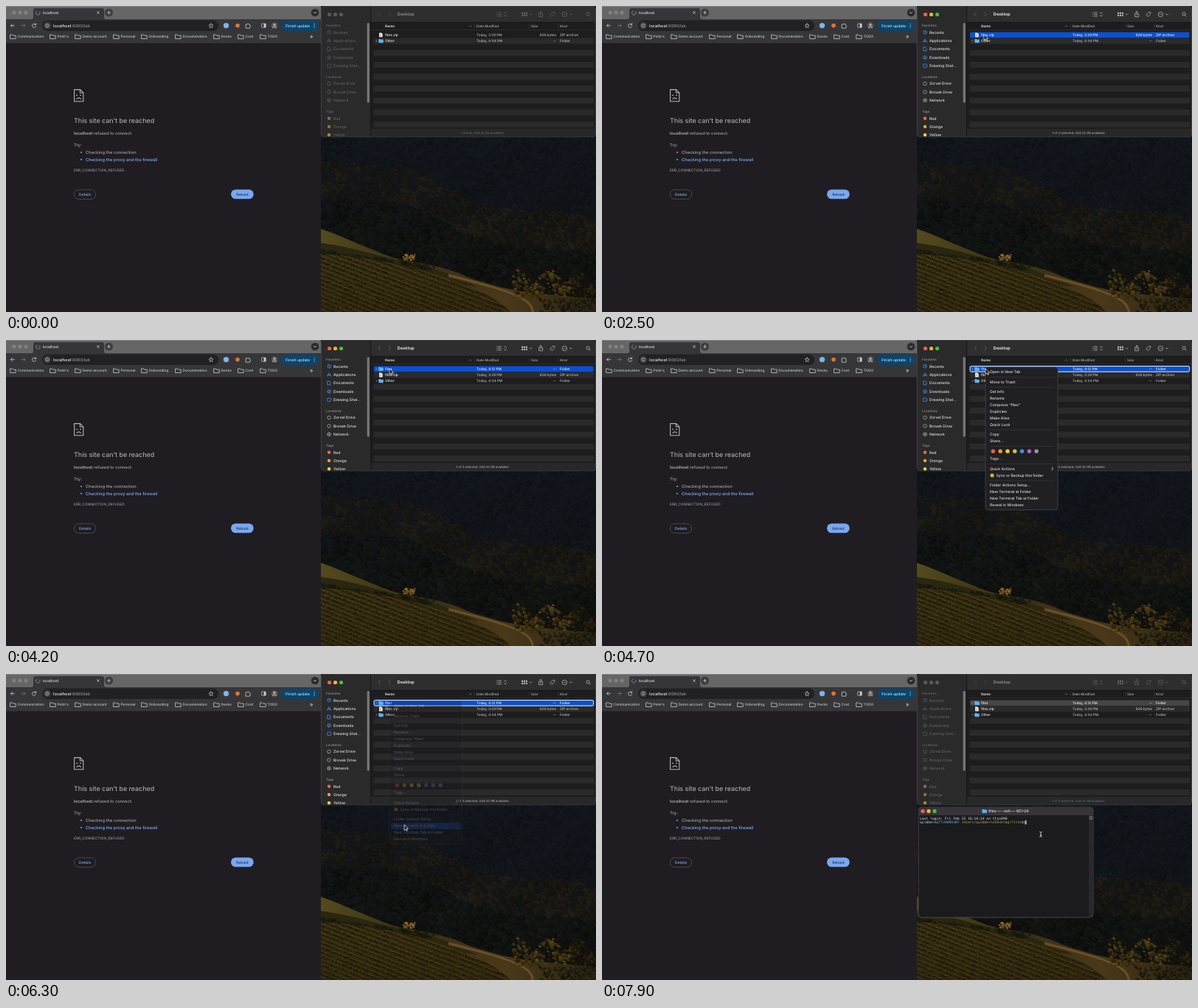
Recreate the animation shown at these times as an HTML page with a canvas. Size 800 by 416 pixels, loop 8 s.

```html
<!DOCTYPE html>
<html lang="en">
<head>
<meta charset="utf-8">
<title>Desktop session</title>
<style>
html, body { margin: 0; width: 100%; height: 100%; overflow: hidden; background: #1f1d21; }
canvas, svg { position: absolute; left: 0; top: 0; width: 800px; height: 416px; }
text { font-family: Inter, "Liberation Sans", sans-serif; text-rendering: geometricPrecision; white-space: pre; }
.mono { font-family: "DejaVu Sans Mono", "Noto Sans Mono", monospace; }
#pointer { animation: move 8s linear infinite; }
#menu { animation: menu 8s linear infinite; }
@keyframes move {
  0%, 4% { transform: translate(600px, 290px); }
  14%, 22% { transform: translate(521px, 39px); }
  25%, 46% { transform: translate(518px, 39px); }
  52%, 64% { transform: translate(520px, 39px); }
  75%, 82% { transform: translate(540px, 205px); }
  92%, 100% { transform: translate(595px, 218px); }
}
@keyframes menu {
  0%, 56.24% { opacity: 0; }
  56.25%, 76.87% { opacity: 1; }
  79.38%, 100% { opacity: 0; }
}
</style>
</head>
<body>
<canvas width="800" height="416"></canvas>
<svg viewBox="0 0 800 416"></svg>
<script>
// ---- drawing helpers ----
const text = (x, y, s, size, fill, extra = '') =>
  `<text x="${x}" y="${y + size * 0.36}" font-size="${size}" fill="${fill}" ${extra}>${s}</text>`;
const rect = (x, y, w, h, fill, r = 0, extra = '') =>
  `<rect x="${x}" y="${y}" width="${w}" height="${h}" rx="${r}" fill="${fill}" ${extra}/>`;
const dot = (x, y, r, fill, extra = '') => `<circle cx="${x}" cy="${y}" r="${r}" fill="${fill}" ${extra}/>`;
const line = (d, stroke, w = 0.8, fill = 'none') =>
  `<path d="${d}" stroke="${stroke}" stroke-width="${w}" fill="${fill}" stroke-linecap="round" stroke-linejoin="round"/>`;
const medium = 'font-weight="500"', semi = 'font-weight="600"', end = 'text-anchor="end"', mid = 'text-anchor="middle"';

let rules = '', count = 0;
// Visible only between two times in ms
function show(from, to, body) {
  const name = 'v' + count++;
  rules += `@keyframes ${name}{0%{opacity:${from ? 0 : 1}}${from / 80}%{opacity:1}${to / 80}%{opacity:0}}`;
  return `<g style="animation:${name} 8s step-end infinite">${body}</g>`;
}

const lights = (x, y, gap, r, colors) => colors.map((c, i) => dot(x + i * gap, y, r, c)).join('');
const bright = ['#f45f52', '#f0b52f', '#4bbb45'];

// ---- browser ----
function browser() {
  const ink = '#c9cbd0', bar = '#363639', body = '#a3a5aa', link = '#82b0f6';
  const marks = [[6, 'Communication'], [60, "Pelm's"], [94, 'Demo account'], [146, 'Personal'], [184, 'Onboarding'],
    [230, 'Documenation'], [282, 'Decks'], [315, 'Cost'], [345, 'TODO']];
  const folder = x => line(`M${x} 39h2.6l1 1.2h3.6v4.3h-7.2z`, ink, 0.8);
  return rect(0, 0, 427, 416, '#1f1d21') +
    rect(0, 0, 427, 20, '#666667') + rect(0, 0, 427, 0.8, '#8a8a8b') +
    lights(11, 9, 8, 2.5, ['#828283', '#828283', '#828283']) +
    `<path d="M34 18q3 0 3-3V6q0-3 3-3h90q3 0 3 3v9q0 3 3 3z" fill="${bar}"/>` +
    rect(0, 18, 427, 32.5, bar) +
    line('M42 6.8a2.8 2.8 0 1 0 3.8 1.2', '#9b9da2', 0.8) +
    text(50, 9, 'localhost', 4.9, '#e6e6e8', medium) +
    line('M123.6 7.6l2.8 2.8m0-2.8l-2.8 2.8', '#d8d8da', 0.7) +
    dot(139.5, 9, 5.6, '#3e3e40') + line('M137.5 9h4m-2-2v4', '#d8d8da', 0.7) +
    dot(419, 9, 5.3, '#2c2c2e') + line('M417.4 8.4l1.6 1.6 1.6-1.6', '#d8d8da', 0.8) +
    line('M11.5 26.6h-5m2.2-2.2l-2.2 2.2 2.2 2.2', ink) +
    line('M21 26.6h5m-2.2-2.2l2.2 2.2-2.2 2.2', '#77787c') +
    line('M40.3 25.2a2.6 2.6 0 1 0 .4 2.2M40.6 23.6v1.9h-1.9', ink) +
    rect(49, 19.5, 239, 14.5, '#212124', 7.2) +
    dot(56, 26.6, 5, '#3a3a3e') + dot(56, 26.6, 2.4, 'none', `stroke="${ink}" stroke-width=".7"`) +
    line('M56 26.4v1.3M56 25.3v.1', ink, 0.6) +
    text(64, 26.6, '<tspan fill="#f0f0f2" font-weight="500">localhost</tspan>:8080/lab', 5.6, '#a4a6ab') +
    line('M278 23.8l.9 2 2.1.2-1.6 1.4.5 2.1-1.9-1.1-1.9 1.1.5-2.1-1.6-1.4 2.1-.2z', ink, 0.7) +
    dot(298.5, 26.6, 3.7, '#7fb4e6') + dot(314, 26.6, 2.8, '#d8773a') +
    line('M325.5 25h1.6a1 1 0 0 1 2 0h1.5v1.7a1 1 0 0 1 0 2v1.5h-5.1z', ink, 0.8) +
    rect(346.6, 24, 5.6, 5.2, 'none', 0.6, `stroke="${ink}" stroke-width=".7"`) + rect(349.6, 24, 2.6, 5.2, ink) +
    dot(364, 26.6, 4.4, '#55585c') + dot(364, 25.4, 1.6, '#b7aaa2') + line('M361.7 29.4q2.3-3 4.6 0', '#b7aaa2', 1.2) +
    rect(373, 19.8, 51, 14, '#0b446d', 7) + text(379, 26.7, 'Finish update', 5.15, '#bfe0fb', medium) +
    [24.5, 26.7, 28.9].map(y => dot(418, y, 0.6, '#bfe0fb')).join('') +
    marks.map(([x, s]) => folder(x) + text(x + 9.6, 41.6, s, 4.75, ink, medium)).join('') +
    text(412, 40.8, '»', 7.5, '#e2e2e4') +
    line('M92.6 113.6h8l4.2 4.2v12h-12.2zM100.4 113.8v4.2h4.2M95.6 121.4h.9M100.6 121.4h.9M96 126.4q2.7-3 5.4 0', '#b2b4b9', 1.1) +
    text(92, 155.5, 'This site can’t be reached', 8.9, '#a6a8ad', medium) +
    text(92, 173, '<tspan font-weight="700">localhost</tspan> refused to connect.', 5.65, body, medium) +
    text(92, 188.5, 'Try:', 5.8, body, medium) +
    dot(102, 199, 1, body) + text(108, 198.6, 'Checking the connection', 5.75, body, medium) +
    dot(102, 208.8, 1, link) + text(108, 208.5, 'Checking the proxy and the firewall', 5.75, link, medium) +
    text(92, 223.6, 'ERR_CONNECTION_REFUSED', 4.85, '#94969b', medium) +
    rect(92.3, 249.8, 29.4, 12.8, 'none', 6.4, 'stroke="#595b66" stroke-width=".7"') +
    text(107, 256.2, 'Details', 4.95, link, mid + ' ' + medium) +
    rect(305, 249.5, 30.7, 12.8, '#7aa7f0', 6.4) +
    text(320.4, 255.9, 'Reload', 4.95, '#1c2d4c', mid + ' ' + medium);
}

// ---- file window ----
const folderIcon = (x, y) => rect(x, y - 2.6, 3, 2, '#4e9fdd', 0.5) + rect(x, y - 1.9, 6.4, 4.5, '#62b3ec', 0.6);
const pageIcon = (x, y) => `<path d="M${x} ${y - 2.9}h3l1.6 1.6v4.2h-4.6z" fill="#eee"/>` + rect(x + 1.5, y - 1, 1, 2.6, '#888');

function sidebar(on) {
  const ink = on ? '#e4e4e5' : '#6a6a6b', head = on ? '#8a8a8b' : '#646465';
  const blue = on ? '#3f94f0' : '#535a63', grey = on ? '#a6a6a8' : '#5c5c5d';
  const box = y => rect(435.7, y - 2.2, 4.8, 4.4, 'none', 0.7, `stroke="${blue}" stroke-width=".8"`);
  const ring = (y, c) => dot(438, y, 2.3, 'none', `stroke="${c}" stroke-width=".8"`);
  const items = [
    [35.7, 'Recents', ring(35.7, blue) + line('M438 34.4v1.4h1', blue, 0.6)],
    [47.1, 'Applications', line('M436 49.2l2-4.4 2 4.4M435.5 48h5', blue)],
    [58.5, 'Documents', line('M436.2 56h2.4l1.4 1.4v3.6h-3.8z', blue)],
    [70, 'Downloads', ring(70, blue) + line('M438 68.8v2.4m-1-1l1 1 1-1', blue, 0.6)],
    [81.2, 'Drawing Shel...', box(81.2)],
    [105.5, 'Zorvel Drive', ring(105.5, grey)],
    [116.9, 'Brovek Drive', ring(116.9, grey)],
    [128.2, 'Network', ring(128.2, grey) + line('M435.8 128.2h4.4M438 126v4.4', grey, 0.6)],
    [152.8, 'Red', dot(438, 152.8, 2.2, on ? '#f0694f' : '#84686f')],
    [164, 'Orange', dot(438, 164, 2.2, on ? '#f3a136' : '#a06d2e')],
    [175.2, 'Yellow', dot(438, 175.2, 2.2, on ? '#f5d13c' : '#a68a30')]];
  return [[26, 'Favorites'], [96.5, 'Locations'], [143.5, 'Tags']]
    .map(([y, s]) => text(434, y, s, 4.4, head, semi)).join('') +
    items.map(([y, s, icon]) => icon + text(444, y, s, 5.1, ink, on ? medium : '')).join('');
}

function toolbar(on) {
  const ink = on ? '#b4b4b6' : '#646465', faint = on ? '#646466' : '#4a4a4c';
  const grid = [0, 3.1].map(y => [0, 2.9, 5.8].map(x => rect(699 + x, 8.6 + y, 2.1, 2.3, ink, 0.4)).join('')).join('');
  return lights(438.5, 11.5, 8, 2.6, on ? bright : ['#59595a', '#59595a', '#59595a']) +
    line('M507.4 8.8l-2.4 2.6 2.4 2.6M518.8 8.8l2.4 2.6-2.4 2.6', faint, 0.9) +
    text(530.5, 11.4, 'Desktop', 5.8, on ? '#ececed' : '#8c8c8d', semi) +
    line('M667 9h4.5M667 11.4h4.5M667 13.8h4.5M665.2 9h.1M665.2 11.4h.1M665.2 13.8h.1', ink) +
    line('M675.6 10.2l1.4-1.5 1.4 1.5M675.6 12.6l1.4 1.5 1.4-1.5', ink) +
    grid + line('M710 10.8l1.4 1.4 1.4-1.4', ink) +
    line('M723.8 10.2h-1.2v4.4h5v-4.4h-1.2M725.1 12.4v-5m-1.4 1.4l1.4-1.4 1.4 1.4', ink) +
    line('M738 11.8l3.4-3.4h2.4v2.4l-3.4 3.4z', ink) +
    dot(757.4, 11.4, 3.2, 'none', `stroke="${ink}" stroke-width=".8"`) +
    line('M755.9 11.4h.1M757.4 11.4h.1M758.9 11.4h.1', ink) + line('M764.6 10.8l1.4 1.4 1.4-1.4', ink) +
    dot(789, 10.8, 2.1, 'none', `stroke="${ink}" stroke-width=".8"`) + line('M790.6 12.4l1.6 1.7', ink);
}

function frame() {
  let stripes = '';
  for (let i = 1; i < 17; i += 2) stripes += rect(498.5, 35.4 + i * 8.1, 298.5, 8.1, '#2a2a2b', 1.6);
  return rect(427.4, 0.4, 372.2, 177.4, '#1d1d1e', 4, 'stroke="#505051" stroke-width=".8"') +
    `<path d="M494.5 177.4H432q-4 0-4-4V4.8q0-4 4-4h62.5z" fill="#2a2a2b"/>` +
    `<path d="M495 22V.8h300q4 0 4 4V22z" fill="#2e2e2f"/>` +
    rect(494.2, 0.8, 0.7, 176.6, '#111') + rect(495, 21.8, 304, 0.6, '#101011') +
    rect(495, 32, 304, 0.5, '#3a3a3b') + rect(495, 167.6, 304, 0.5, '#3a3a3b') +
    `<path d="M495 168h304v5.4q0 4-4 4H495z" fill="#28282a"/>` +
    rect(489.6, 23, 3.2, 108.5, '#777778', 1.6) +
    [635, 709, 748].map(x => rect(x, 24, 0.5, 6.5, '#464647')).join('') +
    text(514, 27.2, 'Name', 4.6, '#e6e6e7', semi) + line('M628.3 27.9l1.3-1.3 1.3 1.3', '#a5a5a6', 0.6) +
    [[638, 'Date Modified'], [712, 'Size'], [751, 'Kind']].map(([x, s]) => text(x, 27.2, s, 4.5, '#b5b5b6', medium)).join('') +
    stripes;
}

const zip = ['files.zip', '3:29 PM', '926 bytes', 'ZIP archive'];
const files = ['files', '4:12 PM', '--', 'Folder'];
const other = ['Other', '4:04 PM', '--', 'Folder'];

function rows(list, picked, fill, ring) {
  return list.map(([name, time, size, kind], i) => {
    const y = 39.4 + i * 8.1, on = i === picked, ink = on ? '#f2f4f8' : '#bcbcbe';
    const edge = ring && on ? 'stroke="#f0f4ff" stroke-width="1"' : '';
    const icon = kind === 'Folder'
      ? line(`M501.8 ${y - 1.3}l1.3 1.3-1.3 1.3`, '#a5a5a6', 0.7) + folderIcon(505.3, y)
      : pageIcon(506, y);
    return (on ? rect(499, y - 3.8, 297.6, 7.6, fill, 1.6, edge) : '') + icon +
      text(514, y, name, 4.75, '#ececed', medium) + text(638, y, 'Today, ' + time, 4.65, ink, medium) +
      text(746, y, size, 4.7, ink, end + ' ' + medium) + text(751, y, kind, 4.7, ink, medium);
  }).join('');
}

const status = (s, on) => text(646, 172.4, s + ', 244.32 GB available', 4.2, on ? '#a9a9aa' : '#666667', mid + ' ' + medium);

function finder() {
  const blue = '#0b50cf', three = [files, zip, other];
  const off = sidebar(false) + toolbar(false);
  return `<clipPath id="win"><rect x="428" y="0" width="371" height="177.4" rx="4"/></clipPath>` +
    frame() + '<g clip-path="url(#win)">' +
    show(0, 1900, off + rows([zip, other], -1) + status('2 items', false)) +
    show(1900, 6700, sidebar(true) + toolbar(true)) +
    show(1900, 3000, rows([zip, other], 0, blue) + status('1 of 2 selected', true)) +
    show(3000, 4200, rows(three, 1, blue)) +
    show(4200, 4500, rows(three, 0, blue)) +
    show(4500, 6400, rows(three, 0, blue, true)) +
    show(6400, 6700, rows(three, 0, blue)) +
    show(3000, 6700, status('1 of 3 selected', true)) +
    show(6700, 8000, off + rows(three, 0, '#454546') + status('1 of 3 selected', false)) + '</g>';
}

// ---- context menu ----
function menu() {
  const items = [[43.5, 'Open in New Tab'], [57, 'Move to Trash'], [70.5, 'Get Info'], [79.4, 'Rename'],
    [88.3, 'Compress “files”'], [97.2, 'Duplicate'], [106.2, 'Make Alias'], [115.1, 'Quick Look'],
    [128.5, 'Copy'], [137.5, 'Share...'], [161.4, 'Tags...'], [175, 'Quick Actions'], [184, 'Sync or Backup this folder'],
    [197.6, 'Folder Actions Setup...'], [206.6, 'New Terminal at Folder'], [215.5, 'New Terminal Tab at Folder'],
    [224.4, 'Reveal in Windows']];
  const tags = ['#ef5b50', '#f09a36', '#f2cb3c', '#c9c445', '#4b8df0', '#a86bd0', '#98989a'];
  // Pointer travels 39 to 205 between 5120 and 6000 ms
  const reach = y => 5120 + (y - 39) / 166 * 880;
  const hover = items.slice(0, 15).map(([y], i) =>
    show(Math.round(reach(y - 4.4)), i === 14 ? 6400 : Math.round(reach(y + 4.4)), rect(522, y - 4.4, 94.5, 8.8, '#2c56b8', 1.6))).join('');
  return rect(520, 37, 98, 194, '#202022', 3, 'stroke="#505053" stroke-width=".7"') + hover +
    [50.3, 63.8, 121.8, 144.2, 168.2, 190.8].map(y => rect(525.5, y, 87, 0.5, '#454547')).join('') +
    items.map(([y, s]) => text(s.startsWith('Sync') ? 534.5 : 526, y, s, 5.1, '#dedee0', medium)).join('') +
    tags.map((c, i) => dot(530.3 + i * 9.8, 151.2, 2.7, c)).join('') +
    dot(529, 184, 2.6, '#d9b13a') + line('M609.8 173l1.9 2-1.9 2', '#dedee0', 0.8);
}

// ---- terminal ----
function terminal() {
  const type = (y, s) => text(431, y, s, 4.7, '#e2e2e4', 'class="mono"');
  const user = 'quibbern';
  return rect(429, 181, 237, 150, '#1b1a1d', 4, 'stroke="#5a5a5d" stroke-width=".7"') +
    `<path d="M429.4 192v-7q0-3.6 3.6-3.6h229q3.6 0 3.6 3.6v7z" fill="#37353a"/>` +
    lights(435, 186.4, 8, 2.6, bright) + folderIcon(515.5, 186.4) +
    text(524, 186.4, 'files — -zsh — 80×24', 5.2, '#cfcfd2', semi) +
    `<path d="M660 192h5.6v135q0 3.6-3.6 3.6h-2z" fill="#29282c"/>` +
    rect(661.3, 193.6, 3.4, 4, 'none', 0.4, 'stroke="#a5a5a8" stroke-width=".6"') + rect(662.2, 195.4, 1.6, 0.6, '#a5a5a8') +
    show(7000, 8000, type(196, 'Last login: Fri Feb 23 16:10:34 on ttys000')) +
    show(7300, 8000, type(201.8, `<tspan fill="#b9d3dc">${user}</tspan><tspan fill="#5aa7e6">@TYJWWDN4BY</tspan> ` +
      `<tspan fill="#b0aa45">/Users/${user}/Desktop/files</tspan>$`) + rect(573, 199.2, 2.8, 5.2, '#a0a0a3'));
}

function pointer() {
  const arrow = '<path d="M0 0v7.4l1.8-1.6 1.2 2.6 1.3-.6-1.2-2.5h2.4z" fill="#0a0a0a" stroke="#fff" stroke-width=".7"/>';
  const beam = line('M-1.5-3.4q1.5 0 1.5 1v4.8q0 1-1.5 1M1.5-3.4q-1.5 0-1.5 1M1.5 3.4q-1.5 0-1.5-1M-.8.8h1.6', '#e6e6e6', 0.8);
  return show(400, 6900, arrow) + show(6900, 8000, beam);
}

// ---- wallpaper ----
function wallpaper(g) {
  let seed = 7;
  const rnd = (a, b) => a + (b - a) * ((seed = seed * 16807 % 2147483647) / 2147483647);
  const shape = (d, fill) => { g.fillStyle = fill; g.fill(new Path2D(d)); };
  const fade = (x0, y0, x1, y1, ...stops) => {
    const f = g.createLinearGradient(x0, y0, x1, y1);
    stops.forEach((c, i) => f.addColorStop(i / (stops.length - 1), c));
    return f;
  };
  // Soft foliage clump: shaded base with a lighter crown
  const leaf = (x, y, r, h, s, l, depth = 1) => {
    for (const [shift, k, up] of [[0.35, 1, -2], [0, 0.8, 0], [-0.3, 0.4, 1.5]]) {
      g.fillStyle = `hsl(${h} ${s}% ${Math.max(2, l + up * depth)}%)`;
      g.beginPath();
      g.ellipse(x + shift * r, y + shift * r, r * k, r * k * 0.85, 0, 0, 7);
      g.fill();
    }
  };

  g.fillStyle = fade(0, 178, 0, 400, '#12171d', '#111418', '#10110c');
  g.fillRect(427, 0, 373, 416);
  for (let i = 0; i < 3000; i++) {
    const y = 170 + i / 3000 * 215, x = rnd(424, 804), r = rnd(1.2, 2.8) + (y - 170) / 80;
    const d = y - 200 - (x - 427) * 0.27 + 10 * Math.sin(x / 38);
    const glow = 0.5 + 0.5 * Math.sin(x / 23 + y / 17);
    if (d < 0) leaf(x, y, r, rnd(205, 222), 24, rnd(7, 9) + glow, 0.5);
    else if (d < 50) leaf(x, y, r, rnd(38, 60), 18, rnd(6.5, 9) + glow * 1.5, 0.7);
    else leaf(x, y, r, rnd(60, 190), 10, rnd(5, 7.5) + glow, 0.7);
  }

  shape('M427 303C455 312 490 330 525 342C560 350 590 352 625 368C665 384 700 390 800 398V416H427Z',
    fade(427, 0, 800, 0, '#554a1d', '#352e13', '#4a381a', '#2b2510'));
  shape('M427 322C470 328 500 338 545 350C580 354 610 368 640 382L427 345Z', '#292710');
  for (let i = 0; i < 140; i++) {
    const x = rnd(427, 580);
    leaf(x, 335 + (x - 427) * 0.14 + rnd(-4, 3), rnd(1.2, 3), rnd(44, 70), 30, rnd(7, 12));
  }

  g.save();
  const vines = 'M427 337C490 340 560 355 610 374C650 390 672 402 684 416H427Z';
  g.clip(new Path2D(vines));
  shape(vines, fade(0, 337, 0, 416, '#383010', '#2e240c'));
  for (let k = -32; k < 18; k++) {
    for (let x = 427; x < 690; x += 2.2) {
      const y = 341 + k * 6 + (x - 427) * (0.38 + k * 0.003);
      if (y < 332 || y > 420) continue;
      g.fillStyle = `hsl(${rnd(38, 54)} 48% ${rnd(7, 12)}%)`;
      g.fillRect(x, y + rnd(-0.8, 0.8), 2.4, 2.6);
      g.fillStyle = `hsl(43 52% ${rnd(16, 27)}%)`;
      g.fillRect(x, y - 1.4 + rnd(-0.4, 0.4), 1.4, 1.1);
    }
  }
  g.restore();

  const road = new Path2D('M600 366C635 375 655 380 678 388C705 398 716 406 714 420');
  for (const [c, w] of [['#46351a', 6], ['#6b5128', 2.6]]) {
    g.strokeStyle = c; g.lineWidth = w; g.stroke(road);
  }
  for (let i = 0; i < 150; i++) leaf(rnd(722, 804), rnd(398, 418), rnd(1, 2.4), 46, 35, rnd(7, 12));
  for (let i = 0; i < 200; i++) {
    const x = rnd(686, 800), top = 366 + 8 * Math.sin(x / 7) + Math.max(0, x - 765) * 0.3;
    const lit = x < 765 ? rnd(9, 22) : rnd(7, 13);
    leaf(x, rnd(top, 396), rnd(1.2, 3), rnd(36, 48), 55, lit, 1.5);
  }
  for (let i = 0; i < 24; i++) leaf(rnd(537, 555), rnd(338, 345), rnd(1, 2), rnd(30, 40), 52, rnd(24, 40), 1.5);
}

wallpaper(document.querySelector('canvas').getContext('2d'));
document.querySelector('svg').innerHTML = browser() + finder() + show(6700, 8000, terminal()) +
  `<g id="menu">${menu()}</g><g id="pointer">${pointer()}</g>`;
const sheet = document.createElement('style');
sheet.textContent = rules;
document.head.append(sheet);
</script>
</body>
</html>
```
